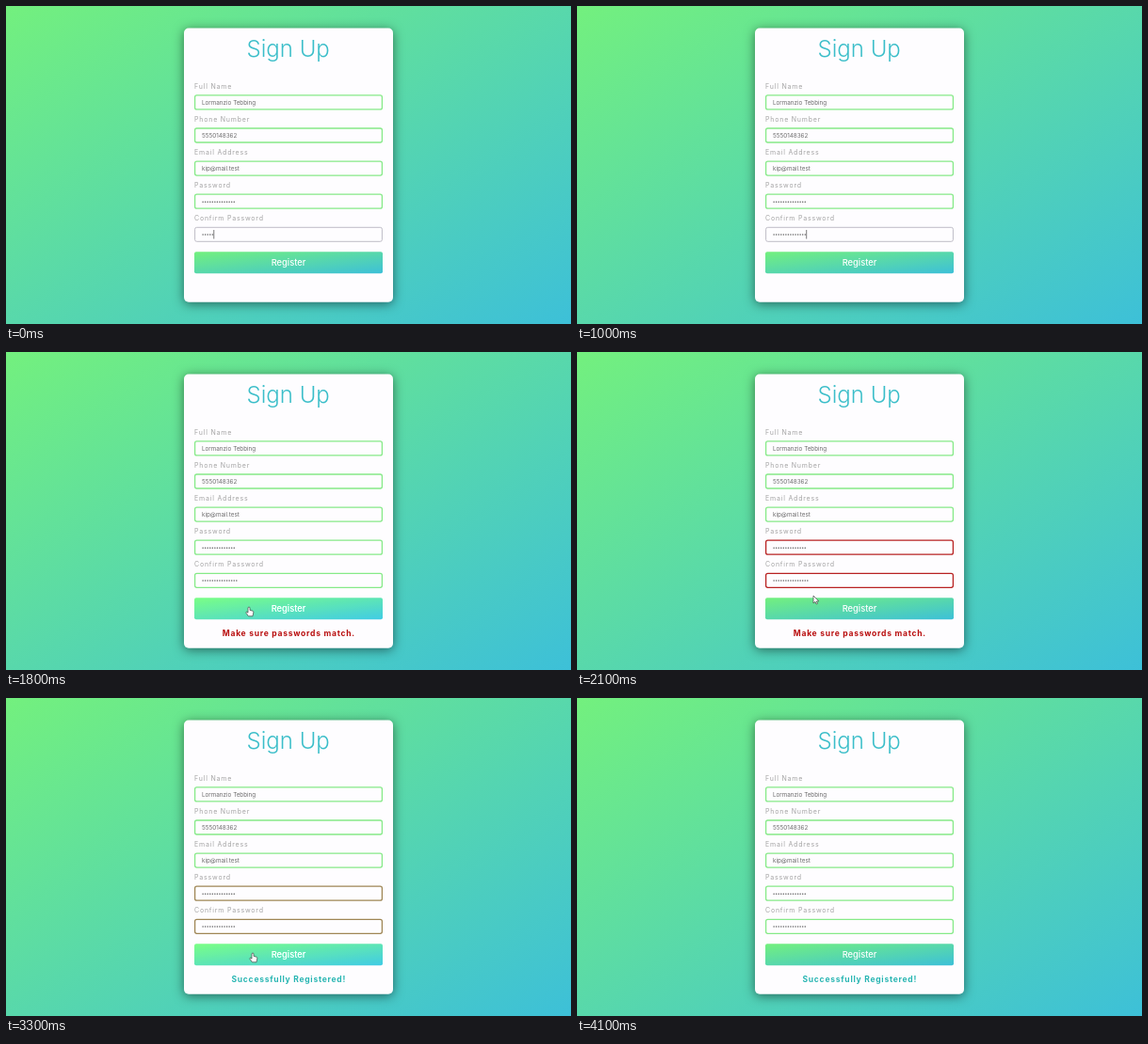
Animation, 600 px wide and 338 px high, one loop 4.2 s. Source, as an HTML page:

```html
<!DOCTYPE html>
<html lang="en">
<head>
<meta charset="utf-8">
<title>Sign Up</title>
<style>
  html, body { margin: 0; width: 100%; height: 100%; overflow: hidden; }
  svg { display: block; width: 100%; height: 100%; font-family: Inter, "Open Sans", sans-serif; }
  #card { fill: #fefdff; filter: drop-shadow(0 2px 6px rgba(0, 0, 0, .5)); }
  .title { font-size: 24px; font-weight: 300; fill: #3bbec9; }
  .label { font-size: 7px; letter-spacing: .8px; fill: #a3a3a3; }
  .value { font-size: 6.3px; fill: #6b6b6b; }
  .box { fill: #fefdff; stroke: #86ea88; stroke-width: 1.3; }
  .dot { fill: #5c5c5c; }
  .register { font-size: 9.3px; font-weight: 500; fill: #fff; }
  #message { font-size: 8.5px; font-weight: 700; letter-spacing: .75px; }
  .center { text-anchor: middle; }
  #pointer path { fill: #fff; stroke: #444; stroke-width: .7; stroke-linejoin: round; }
  #pointer #beam { fill: none; }
</style>
</head>
<body>
<svg viewBox="0 0 600 338" preserveAspectRatio="none">
  <defs>
    <linearGradient id="fresh" x2="1" y2="1">
      <stop stop-color="#73f07e"/>
      <stop offset="1" stop-color="#3dc0d8"/>
    </linearGradient>
  </defs>
  <rect width="600" height="338" fill="url(#fresh)"/>
  <rect id="card" x="189" y="23.5" width="222" height="291.3" rx="5"/>
  <text class="title center" x="299.7" y="53.5">Sign Up</text>
  <g id="fields"></g>
  <g id="button">
    <rect x="200" y="261.3" width="200" height="22.9" rx="2" fill="url(#fresh)"/>
    <text class="register center" x="300" y="276">Register</text>
  </g>
  <text id="message" class="center" x="300.3" y="302.4"></text>
  <path id="caret" d="M0 238v9.5" stroke="#444" stroke-width=".7"/>
  <g id="pointer">
    <path id="arrow" d="M0 0V8L2 6.4 3.2 9 4.5 8.4 3.3 5.9H5.8Z"/>
    <path id="hand" d="M-1 .6Q0-.6 1 .6V3.4L4 4.2Q5 4.6 4.8 5.8L4 9.8H-.6L-3 6.4Q-3.4 5-2.2 5.2L-1 6.2Z"/>
    <path id="beam" d="M-1.5 0H1.5M0 0V7M-1.5 7H1.5"/>
  </g>
</svg>
<script>
const LOOP = 4200, FRAME = 100;
const FIELD_TOP = 94.9, FIELD_STEP = 35.1;
const TEXT_X = 208, DOT_STEP = 2.55, MAX_DOTS = 15;
const GREEN = [134, 234, 136], RED = [184, 34, 34], GRAY = [190, 188, 198];
const FIRST_CLICK = 1800, SECOND_CLICK = 3200, FADE = 200;

const fields = [
  ["Full Name", "Lormanzio Tebbing"],
  ["Phone Number", "5550148362"],
  ["Email Address", "kip@mail.test"],
  ["Password"],
  ["Confirm Password"],
];

// Pointer trips as [time, x, y]; the pointer is hidden between trips.
const trips = [
  [[1600, 246, 326], [1800, 258, 271], [2000, 258, 271], [2100, 251, 259], [2400, 364, 239], [2500, 364, 239]],
  [[3000, 364, 239], [3200, 262, 271], [3400, 262, 271], [3800, 307, 328], [4000, 230, 331], [4100, 230, 331]],
];

const $ = id => document.getElementById(id);
const clamp = v => Math.max(0, Math.min(1, v));
const mix = (a, b, k) => a + (b - a) * k;
const rgb = (a, b, k) => `rgb(${a.map((v, i) => Math.round(mix(v, b[i], k)))})`;
const show = (el, on) => el.style.display = on ? "" : "none";

function add(tag, attrs, text = "") {
  const el = document.createElementNS("http://www.w3.org/2000/svg", tag);
  for (const name in attrs) el.setAttribute(name, attrs[name]);
  el.textContent = text;
  return $("fields").appendChild(el);
}

const addDots = (y, count) => Array.from({ length: count }, (_, i) =>
  add("circle", { class: "dot", cx: TEXT_X + 1.1 + i * DOT_STEP, cy: y, r: .75 }));

const boxes = fields.map(([label, value], i) => {
  const y = FIELD_TOP + i * FIELD_STEP;
  add("text", { class: "label", x: 200, y: y - 7.4 }, label);
  const box = add("rect", { class: "box", x: 200.6, y, width: 198.8, height: 15, rx: 2 });
  if (value) add("text", { class: "value", x: TEXT_X, y: y + 9.8 }, value);
  return box;
});
addDots(FIELD_TOP + 3 * FIELD_STEP + 8, 14);
const confirmDots = addDots(FIELD_TOP + 4 * FIELD_STEP + 7.8, MAX_DOTS);

function drawFields(t) {
  const count = t < 2700 ? Math.min(MAX_DOTS, 5 + Math.round(t * 6 / 700)) : 14;
  confirmDots.forEach((dot, i) => show(dot, i < count));
  show($("caret"), t < 1300 || (t >= 2500 && t < SECOND_CLICK));
  $("caret").setAttribute("transform", `translate(${TEXT_X + count * DOT_STEP})`);

  const redness = clamp((t - FIRST_CLICK) / FADE) - clamp((t - SECOND_CLICK) / FADE);
  const stroke = rgb(GREEN, RED, redness);
  const typing = t < 1200;
  boxes[3].style.stroke = stroke;
  boxes[4].style.stroke = typing ? rgb(GRAY, GRAY, 0) : stroke;
  boxes[4].style.strokeWidth = typing ? 1 : 1.3;
}

function drawMessage(t) {
  const done = t >= SECOND_CLICK;
  $("message").textContent = t < FIRST_CLICK ? ""
    : done ? "Successfully Registered!" : "Make sure passwords match.";
  $("message").style.fill = done ? "#27b5b2" : "#b80c0c";
}

function drawPointer(t) {
  const trip = trips.find(p => t >= p[0][0] && t < p.at(-1)[0]);
  show($("pointer"), trip);
  let onButton = false;
  if (trip) {
    const i = trip.findIndex(p => p[0] > t);
    const [t0, x0, y0] = trip[i - 1], [t1, x1, y1] = trip[i];
    const k = (t - t0) / (t1 - t0);
    const x = mix(x0, x1, k), y = mix(y0, y1, k);
    onButton = y > 261 && y < 284;
    const onField = y < 250;
    show($("hand"), onButton);
    show($("beam"), onField);
    show($("arrow"), !onButton && !onField);
    $("pointer").setAttribute("transform", `translate(${x} ${y})`);
  }
  $("button").style.filter = onButton ? "brightness(1.06)" : "none";
}

function draw(now) {
  const t = Math.floor(now % LOOP / FRAME) * FRAME;
  drawFields(t);
  drawMessage(t);
  drawPointer(t);
}

const start = performance.now();
(function tick() {
  draw(performance.now() - start);
  requestAnimationFrame(tick);
})();
</script>
</body>
</html>
```
